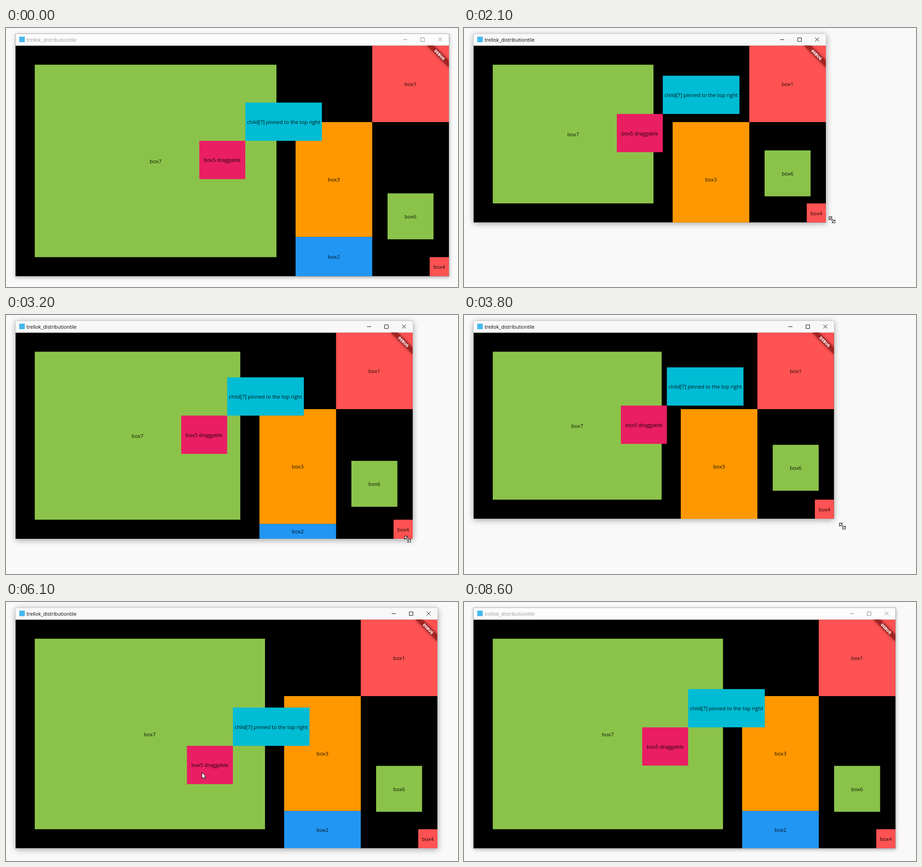
Recreate the animation shown at these times as an HTML page with a canvas. Size 988 by 567 pixels, loop 8.7 s.

```html
<!DOCTYPE html>
<html lang="en">
<head>
<meta charset="utf-8">
<title>Box layout</title>
<style>
  html, body { margin: 0; width: 100%; height: 100%; overflow: hidden; background: #f9f9f9; }
  canvas { display: block; }
</style>
</head>
<body>
<canvas id="stage" width="988" height="567"></canvas>
<script>
const ctx = document.getElementById('stage').getContext('2d');
const LOOP = 8700, STEP = 100;
const K = 0.8375;            // layout units to pixels
const LEFT = 21, TOP = 38.5; // corner of the window content
const FONT = '"Open Sans", "Noto Sans", sans-serif';

// Turning points of each motion: time, x, y
const corner = [
  [1200, 968, 543.5], [2000, 784.6, 438], [2400, 850, 400], [2700, 928, 430],
  [3200, 889, 490], [3700, 800, 440], [4360, 943, 539.3]
];
const drag = [
  [5000, 0, 0], [5200, 55, -119], [5400, 112, -32], [6100, -14.5, 70],
  [6300, -156, -8], [6700, -60, -84], [7200, -4, -32], [7400, -15, 51.5], [7600, -20.5, 29.5]
];
const enter = [[200, 980, 290], [800, 968, 548]];
const reach = [[4500, 945, 544], [5000, 461, 308]];
const leave = [[7700, 440, 337], [8300, 974, 65]];

// Monotone cubic through the turning points
function slope(keys, i, c) {
  if (i < 1 || i > keys.length - 2) return 0;
  const [p, q, r] = keys.slice(i - 1, i + 2);
  const a = (q[c] - p[c]) / (q[0] - p[0]), b = (r[c] - q[c]) / (r[0] - q[0]);
  return a * b <= 0 ? 0 : 2 * a * b / (a + b);
}

function at(keys, t) {
  const last = keys.length - 1;
  t = Math.min(Math.max(t, keys[0][0]), keys[last][0]);
  let i = 0;
  while (i < last - 1 && t > keys[i + 1][0]) i++;
  const p = keys[i], q = keys[i + 1], d = q[0] - p[0], u = (t - p[0]) / d, v = 1 - u;
  return [1, 2].map(c =>
    p[c] * (1 + 2 * u) * v * v + q[c] * u * u * (3 - 2 * u) +
    d * u * v * (slope(keys, i, c) * v - slope(keys, i + 1, c) * u));
}

function box(color, x, y, w, h, label) {
  if (h <= 0) return;
  ctx.fillStyle = color;
  ctx.fillRect(x, y, w, h);
  ctx.fillStyle = 'rgba(0,0,0,.9)';
  ctx.font = '11.24px ' + FONT;
  ctx.textAlign = 'center';
  ctx.fillText(label, x + w / 2, y + h / 2 + 4.6);
}

function shape(points, x, y, angle, outline) {
  ctx.save();
  ctx.translate(x, y);
  ctx.rotate(angle);
  ctx.beginPath();
  points.forEach(p => ctx.lineTo(...p));
  ctx.closePath();
  ctx.fillStyle = '#fff';
  ctx.strokeStyle = outline;
  ctx.lineWidth = 1;
  ctx.fill();
  ctx.stroke();
  ctx.restore();
}

const arrow = (x, y, outline = '#000') => shape(
  [[0, 0], [0, 13.5], [3, 10.8], [5.2, 15.8], [7.2, 15], [5.1, 10], [9.3, 10]], x, y, 0, outline);

function resizer(x, y) {
  const head = [[4.5, -1.3], [4.5, -4.5], [9.3, 0], [4.5, 4.5], [4.5, 1.3]];
  shape([...head, ...head.map(([a, b]) => [-a, -b])], x, y, Math.PI / 4, '#000');
}

function frame(right, bottom, active) {
  ctx.save();
  ctx.shadowColor = active ? 'rgba(0,0,0,.38)' : 'rgba(0,0,0,.3)';
  ctx.shadowBlur = active ? 13 : 8;
  ctx.shadowOffsetY = 2;
  ctx.fillStyle = active ? '#f8f8f8' : '#fcfcfc';
  ctx.fillRect(20.5, 12.5, right - 20, bottom - 12);
  ctx.restore();
  ctx.strokeStyle = active ? '#c8c8c8' : '#aaa';
  ctx.lineWidth = 1;
  ctx.strokeRect(20.5, 12.5, right - 20, bottom - 12);

  ctx.fillStyle = '#45b8ee';
  ctx.fillRect(29, 19, 12, 12);
  ctx.fillStyle = active ? '#000' : '#999';
  ctx.font = '10.7px ' + FONT;
  ctx.textAlign = 'left';
  ctx.fillText('trellok_distributiontile', 45, 29.5);

  const x = Math.round(right);
  ctx.strokeStyle = active ? '#111' : '#888';
  ctx.beginPath();
  ctx.moveTo(x - 100, 25.5); ctx.lineTo(x - 91, 25.5);
  ctx.rect(x - 61.5, 21.5, 8, 8);
  ctx.moveTo(x - 23.5, 21); ctx.lineTo(x - 15, 29.5);
  ctx.moveTo(x - 15, 21); ctx.lineTo(x - 23.5, 29.5);
  ctx.stroke();
}

function banner(right) {
  ctx.save();
  ctx.translate(right, TOP);
  ctx.rotate(Math.PI / 4);
  ctx.scale(K, K);
  ctx.shadowColor = 'rgba(0,0,0,.5)';
  ctx.shadowBlur = 6;
  ctx.fillStyle = '#a32424';
  ctx.fillRect(-40, 28, 80, 12);
  ctx.shadowColor = 'transparent';
  ctx.fillStyle = '#fff';
  ctx.font = '800 10px ' + FONT;
  ctx.textAlign = 'center';
  ctx.fillText('DEBUG', 0, 37.7);
  ctx.restore();
}

function content(right, bottom, dx, dy) {
  const side = 200 * K, small = 50 * K, mid = 120 * K, low = 100 * K;
  const col = right - side, col2 = col - side;
  const y3 = TOP + side, y2 = y3 + 300 * K;
  const x5 = (LEFT + right) / 2 - 72 + dx, y5 = (TOP + bottom) / 2 - 44 + dy;

  ctx.save();
  ctx.beginPath();
  ctx.rect(LEFT, TOP, right - LEFT, bottom - TOP);
  ctx.clip();
  ctx.fillStyle = '#000';
  ctx.fillRect(LEFT, TOP, right - LEFT, bottom - TOP);
  box('#ff5252', col, TOP, side, side, 'box1');
  box('#2196f3', col2, y2, side, bottom - y2, 'box2');
  box('#ff9800', col2, y3, side, 300 * K, 'box3');
  box('#ff5252', right - small, bottom - small, small, small, 'box4');
  box('#8bc34a', right - side / 2 - mid / 2, TOP + 0.8 * (bottom - TOP - mid), mid, mid, 'box6');
  box('#8bc34a', LEFT + small, TOP + small,
    col2 - LEFT - 2 * small, bottom - TOP - 2 * small, 'box7');
  box('#e91e63', x5, y5, mid, low, 'box5 draggable');
  box('#00bcd4', x5 + mid, y5 - low, side, low, 'child[7] pinned to the top right');
  banner(right);
  ctx.restore();
}

// The pointer runs slightly ahead of whatever it drags
function pointer(t) {
  if (t < 300) return;
  if (t < 800) arrow(...at(enter, t));
  else if (t < 4600) {
    const [x, y] = at(corner, t + 80);
    resizer(x + 1, y + 4);
  } else if (t < 5000) arrow(...at(reach, t));
  else if (t < 7700) {
    const [x, y] = at(drag, t + 35);
    arrow(x + 461, y + 308);
  } else arrow(...at(leave, t), t < 8300 ? '#000' : '#f4f4f4');
}

function draw(now) {
  const t = Math.floor(now % LOOP / STEP) * STEP;
  const [right, bottom] = at(corner, t);
  ctx.fillStyle = '#f9f9f9';
  ctx.fillRect(0, 0, 988, 567);
  frame(right, bottom, t >= 1100 && t < 8600);
  content(right, bottom, ...at(drag, t));
  pointer(t);
}

const start = performance.now();
function tick() {
  draw(performance.now() - start);
  requestAnimationFrame(tick);
}
tick();
</script>
</body>
</html>
```
